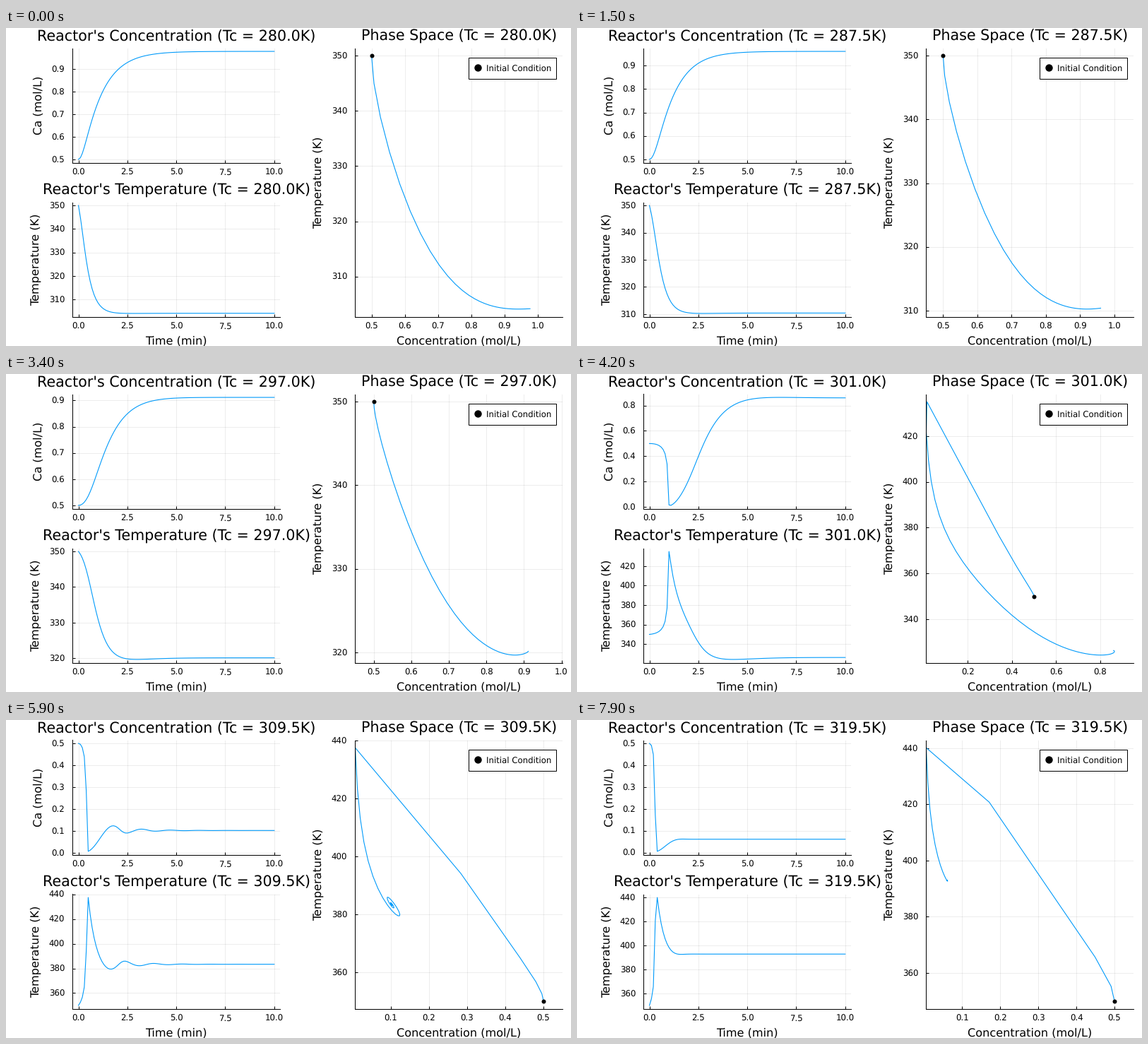
These frames come from a looping animation (800x450 px, 8 s). A matplotlib script:

```python
import matplotlib.pyplot as plt
import numpy as np
from matplotlib.animation import FuncAnimation

W, H, DPI = 800, 450, 100
PX = 72 / DPI
TITLE, GUIDE, TICK = 20.6 * PX, 16.1 * PX, 11.75 * PX
BLUE = "#009AFA"

plt.rcParams.update({
    "font.family": "DejaVu Sans",
    "font.size": TICK,
    "axes.linewidth": PX,
    "axes.spines.top": False,
    "axes.spines.right": False,
    "axes.axisbelow": True,
    "text.hinting": "none",
})


def rates(ca, temp, tc):
    """Cooled stirred tank with one exothermic reaction."""
    r = 7.2e10 * np.exp(-8750 / temp) * ca
    dca = 1 - ca - r
    dtemp = 350 - temp + 5e4 / 239 * r + 5e4 / 23900 * (tc - temp)
    return np.array([dca, dtemp])


def simulate(tc, samples=101, dt=0.1, sub=60):
    y = np.array([np.full(tc.shape, 0.5), np.full(tc.shape, 350.0)])
    out, h = [y], dt / sub
    for _ in range(samples - 1):
        for _ in range(sub):
            k1 = rates(*y, tc)
            k2 = rates(*(y + h / 2 * k1), tc)
            k3 = rates(*(y + h / 2 * k2), tc)
            k4 = rates(*(y + h * k3), tc)
            y = y + h / 6 * (k1 + 2 * k2 + 2 * k3 + k4)
        out.append(y)
    return np.array(out)


def widen(v):
    pad = 0.03 * (v.max() - v.min())
    return v.min() - pad, v.max() + pad


def nice_ticks(lo, hi):
    """Pick 4 to 8 round ticks by count, coverage and roundness."""
    span = hi - lo
    best, top = [], -np.inf
    for z in range(-2, 1):
        for q, nice in ((1, 1), (5, 0.9), (2, 0.7), (2.5, 0.5), (3, 0.2)):
            step = q * 10.0 ** (np.floor(np.log10(span)) + z)
            t = np.arange(np.ceil(lo / step), np.floor(hi / step) + 1) * step
            n = len(t)
            if not 4 <= n <= 8:
                continue
            score = ((1 - abs(n - 5) / 5) / 4 + nice / 4
                     + span / (2 * (n - 1) * step)
                     + (lo <= 0 <= hi) / 6)
            if score > top:
                best, top = t, score
    return best


def labels(ticks):
    d = next(d for d in range(6) if np.allclose(np.round(ticks, d), ticks, 0, 1e-9))
    return [f"{abs(t) if abs(t) < 1e-9 else t:.{d}f}" for t in ticks]


def label_width(texts):
    em = max(0.636 * len(s) - 0.318 * s.count(".") for s in texts)
    return em * 11.75


class Panel:
    def __init__(self, top, bottom, name, ylabel, xlabel=""):
        self.top, self.bottom, self.name = top, bottom, name
        self.ax = fig.add_axes([0, 0, 1, 1])
        self.ax.tick_params(direction="in", length=4 * PX, width=PX)
        self.ax.tick_params(axis="x", pad=8.4 * PX)
        self.ax.tick_params(axis="y", pad=11 * PX)
        self.ax.grid(color="black", alpha=0.07, lw=PX)
        self.line, = self.ax.plot([], [], color=BLUE, lw=1.1 * PX)
        mid = 1 - (top + bottom) / 2 / H
        self.title = fig.text(0, 1 - (top - 10.5) / H, "", size=TITLE,
                              ha="center", va="baseline")
        self.xguide = fig.text(0, 1 - 447.7 / H, xlabel, size=GUIDE,
                               ha="center", va="baseline")
        self.yguide = fig.text(0, mid, ylabel, size=GUIDE, rotation=90,
                               ha="right", va="center", rotation_mode="default")
        self.yguide.set(ha="center", va="baseline", rotation_mode="anchor")

    def set_data(self, x, y, xlim, xticks, tc):
        self.line.set_data(x, y)
        ylim = widen(y)
        yticks = nice_ticks(*ylim)
        self.ax.set(xlim=xlim, ylim=ylim)
        self.ax.set_xticks(xticks, labels(xticks))
        self.ax.set_yticks(yticks, labels(yticks))
        self.title.set_text(f"{self.name} (Tc = {tc:.1f}K)")
        self.label_w = label_width(labels(yticks))

    def place(self, left, right):
        self.ax.set_position([left / W, 1 - self.bottom / H,
                              (right - left) / W, (self.bottom - self.top) / H])
        mid = (left + right) / 2 / W
        self.title.set_x(mid)
        self.xguide.set_x(mid)
        self.yguide.set_x((left - self.label_w - 24.8) / W)


fig = plt.figure(figsize=(W / DPI, H / DPI), dpi=DPI, facecolor="white")
conc = Panel(28.5, 190.5, "Reactor's Concentration", "Ca (mol/L)")
temp = Panel(246.5, 408.5, "Reactor's Temperature", "Temperature (K)", "Time (min)")
phase = Panel(28.5, 408.5, "Phase Space", "Temperature (K)", "Concentration (mol/L)")
phase.ax.plot([0.5], [350], "o", color="black", ms=6 * PX, mew=0, zorder=3)

# Legend, in stage pixels
key = fig.add_axes([0, 0, 1, 1], xlim=(0, W), ylim=(H, 0))
key.axis("off")
key.add_patch(plt.Rectangle((654.5, 41.5), 124, 30, fc="white", ec="black", lw=PX))
key.plot([668], [56.3], "o", color="black", ms=10.4 * PX, mew=0)
key.text(679.5, 60.6, "Initial Condition", va="baseline")

TC = 280 + 0.5 * np.arange(80)
TIME = np.linspace(0, 10, 101)
TIME_TICKS = np.arange(5) * 2.5
RUNS = simulate(TC)


def draw(i):
    ca, t = RUNS[:, 0, i], RUNS[:, 1, i]
    conc.set_data(TIME, ca, widen(TIME), TIME_TICKS, TC[i])
    temp.set_data(TIME, t, widen(TIME), TIME_TICKS, TC[i])
    xlim = 0.9 * ca.min(), 1.1 * ca.max()
    phase.set_data(ca, t, xlim, nice_ticks(*xlim), TC[i])

    # Both columns share what the tick labels leave over
    left = 71.8 + max(conc.label_w, temp.label_w)
    gap = 83.6 + phase.label_w
    width = (788 - left - gap) / 2
    conc.place(left, left + width)
    temp.place(left, left + width)
    phase.place(788 - width, 788)


anim = FuncAnimation(fig, draw, frames=80, interval=100, repeat=True, repeat_delay=0)
plt.show()
```
